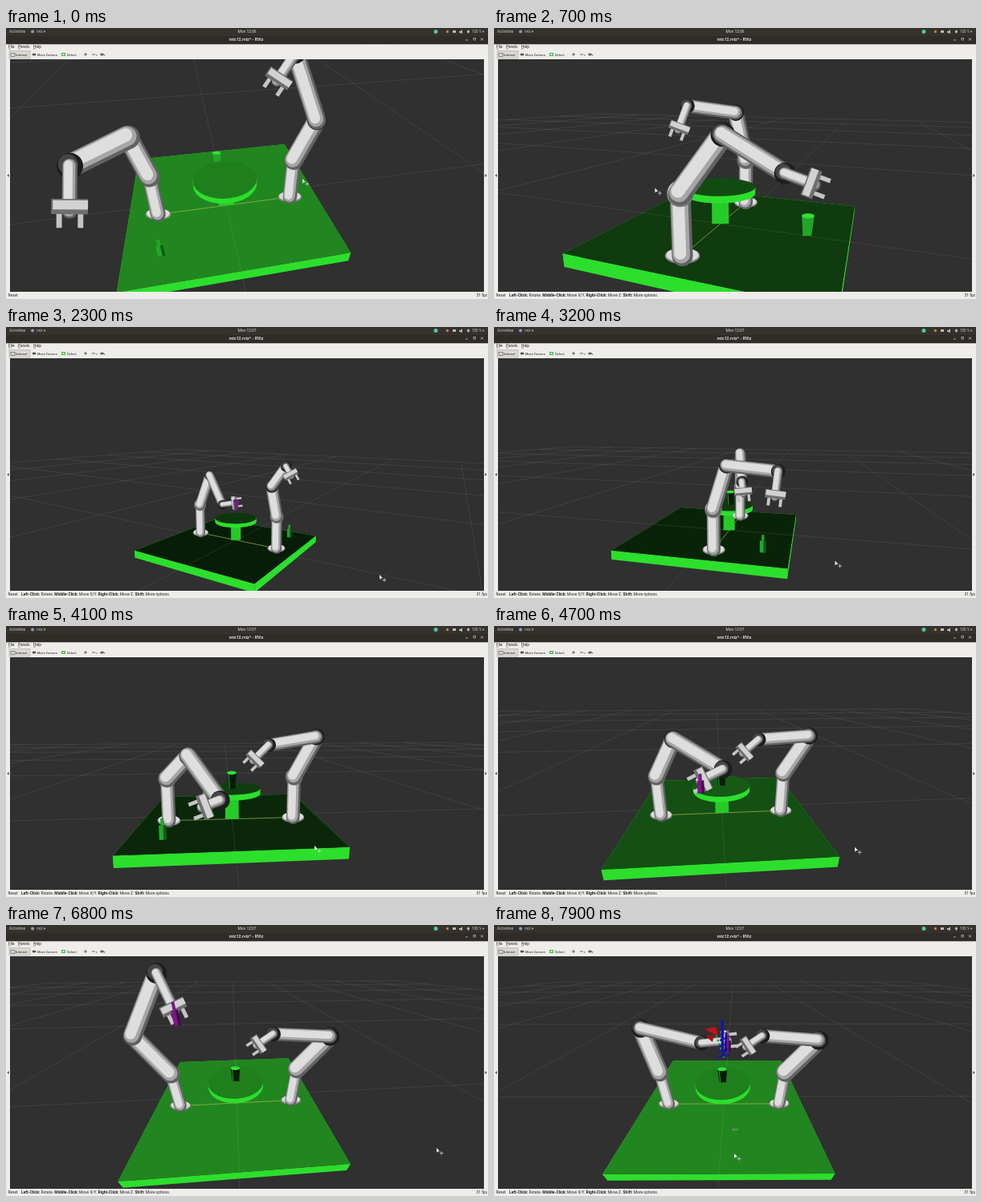
Animation of 600 by 338 pixels, one loop 8 s. Source, as an HTML page with a canvas:

```html
<!DOCTYPE html>
<html lang="en">
<head>
<meta charset="utf-8">
<title>RViz</title>
<style>
html, body { margin: 0; width: 100%; height: 100%; overflow: hidden; background: #303030 }
canvas { display: block; width: 600px; height: 338px }
</style>
</head>
<body>
<canvas id="stage" width="600" height="338"></canvas>
<script>
const g = document.getElementById('stage').getContext('2d');

// cam: yaw, pitch, distance, screen x and y of the slab centre, focal length
// arms: azimuth, then tilt from the vertical of upper arm, forearm and hand
const rest = [2.43, -.5, 1.75, 2.3];
const front = { cam: [6.21, .58, 1.144, 287, 213, 210], tone: [1], right: rest, cursor: [536, 278] };
const poses = [
  { t: 0, cam: [-.2, .62, 1.68, 272, 211, 378], tone: [1], cursor: [369, 188],
    left: [-2.05, .3, 1.4, 2.7], right: [2.4, -.35, .45, 2.6] },
  { t: 1100, cam: [3.16, 0, 1.53, 315, 267, 462], tone: [.12], cursor: [104, 206],
    left: [-1.37, .2, 1.5, 2.7], right: [2.21, 1.25, 3.1, 1.6] },
  { t: 2300, cam: [3.69, .14, 2.6, 280, 269, 420], tone: [.22], cursor: [465, 309],
    left: [-1.49, -.4, 1.2, 2.2], right: [4.39, .4, 2.7, 1.6] },
  { t: 4100, cam: [6.2, .16, 1.68, 281, 236, 350], tone: [.3], cursor: [384, 274],
    left: [-.88, 1, 2.2, 4.3], right: rest },
  { ...front, t: 5500, left: [-.07, 0, 1.65, 4] },
  { ...front, t: 6800, left: [.2, -.45, .6, 2.9] },
  { ...front, t: 7900, cam: [6.28, .58, 1.144, 287, 214, 210], cursor: [299, 285],
    left: [.3, -.1, 1.95, 1.6] }];

// World units: the slab is 1 wide and 1 deep, its top at z = 0
const row = -.07, baseX = .355, tableTop = .18, discRadius = .16;
const links = [.26, .3, .15];
const pink = '#7d1688', green = '#22a52b';
let cam;

function poseAt(t) {
  const i = Math.min(5, poses.findLastIndex(p => p.t <= t));
  const a = poses[i], b = poses[i + 1], u = (t - a.t) / (b.t - a.t);
  const mix = key => a[key].map((v, k) => v + (b[key][k] - v) * u);
  return { cam: mix('cam'), tone: mix('tone')[0], left: mix('left'), right: mix('right'), cursor: mix('cursor') };
}

// Returns screen x and y, depth, and pixels per world unit
function project([x, y, z = 0]) {
  const [yaw, pitch, dist, ox, oy, focal] = cam;
  const c = Math.cos(yaw), s = Math.sin(yaw), cp = Math.cos(pitch), sp = Math.sin(pitch);
  const away = y * c - x * s, depth = dist + away * cp - z * sp, scale = focal / depth;
  return [
    300 + (ox - 300) * dist / depth + scale * (x * c + y * s),
    184 + (oy - 184) * dist / depth - scale * (away * sp + z * cp), depth, scale];
}

function path(points, close) {
  g.beginPath();
  points.forEach(p => g.lineTo(p[0], p[1]));
  if (close) g.closePath();
}
function fill(points, color) { path(points, true); g.fillStyle = color; g.fill(); }
function line(points, color, width = 1) {
  path(points);
  g.strokeStyle = color; g.lineWidth = width; g.stroke();
}
function box(x, y, w, h, color) { g.fillStyle = color; g.fillRect(x, y, w, h); }
function frame(x, y, w, h, color) { g.strokeStyle = color; g.lineWidth = .6; g.strokeRect(x, y, w, h); }
function oval(x, y, rx, ry, color) {
  g.beginPath(); g.ellipse(x, y, rx, ry, 0, 0, 7);
  g.fillStyle = color; g.fill();
}
function text(str, x, y, size, color = '#222', weight = '', align = 'left') {
  g.font = `${weight} ${size}px Roboto, sans-serif`;
  g.textAlign = align; g.fillStyle = color;
  g.fillText(str, x, y);
  return x + g.measureText(str).width;
}
const lit = k => `rgb(${33 * k}, ${134 * k}, ${31 * k})`;
const side = '#2cdf2c';

function drawGrid() {
  const cell = 1.6;
  for (let i = -5; i <= 5; i++) for (const turn of [0, 1]) {
    let last;
    for (let j = -40; j <= 40; j++) {
      const p = [i * cell, j / 8 * cell], q = project(turn ? p.reverse() : p);
      if (q[2] < .15) { last = null; continue; }
      if (last) line([last, q], 'rgba(150,150,150,.26)', .6);
      last = q;
    }
  }
}

function drawSlab(tone) {
  const corners = z => [[-.5, -.5, z], [.5, -.5, z], [.5, .5, z], [-.5, .5, z]].map(project);
  const top = corners(0), low = corners(-.055);
  top.forEach((p, i) => {
    const j = (i + 1) % 4;
    fill([p, top[j], low[j], low[i]], side);
  });
  fill(top, lit(tone));
  line([[0, -.5], [0, .5]].map(project), 'rgba(190,210,180,.2)', .6);
  line([[-baseX, row], [baseX, row]].map(project), 'rgba(185,190,95,.8)', .8);
}

function drawTable(tone) {
  const foot = project([0, row]), head = project([0, row, tableTop]);
  line([foot, head], '#26cb28', .076 * head[3]);
  const ring = z => Array.from({ length: 32 }, (_, i) => {
    const a = i * Math.PI / 16;
    return project([discRadius * Math.cos(a), row + discRadius * Math.sin(a), z]);
  });
  for (let k = 6; k >= 1; k--) fill(ring(tableTop - k * .005), side);
  fill(ring(tableTop), lit(.25 + .7 * tone));
}

function armPoints(x, [azimuth, ...tilts]) {
  const points = [[x, row, 0], [x, row, .24]];
  tilts.forEach((tilt, i) => {
    const [px, py, pz] = points[i + 1], reach = links[i] * Math.sin(tilt);
    points.push([px + reach * Math.cos(azimuth), py + reach * Math.sin(azimuth), pz + links[i] * Math.cos(tilt)]);
  });
  return points;
}

function tube(p, q, width) {
  const layer = (d, color, k) =>
    line([p, q].map(v => [v[0] - d * width, v[1] - d * width]), color, width * k);
  layer(0, '#626262', 1);
  layer(.05, '#a6a6a6', .82);
  layer(.1, '#dedede', .56);
}

function ball([x, y], r, dark) {
  oval(x, y, r, r, dark ? '#1d1d1d' : '#777');
  oval(x - r * .15, y - r * .15, r * .75, r * .75, dark ? '#454545' : '#d8d8d8');
}

function drawArm(world) {
  const pts = world.map(project), [base, shoulder, elbow, wrist, tip] = pts;
  g.lineCap = 'round';
  const s = base[3];
  oval(base[0], base[1], .065 * s, .03 * s, '#8a8a8a');
  oval(base[0], base[1] - 1, .06 * s, .026 * s, '#dcdcdc');
  tube(base, shoulder, .078 * s);
  ball(shoulder, .05 * s);
  tube(shoulder, elbow, .084 * elbow[3]);
  ball(elbow, .044 * elbow[3], true);
  tube(elbow, wrist, .076 * wrist[3]);
  ball(wrist, .042 * wrist[3], true);
  tube(wrist, tip, .05 * tip[3]);
  g.lineCap = 'butt';
  // gripper
  const t = tip[3];
  g.save();
  g.translate(tip[0], tip[1]);
  g.rotate(Math.atan2(tip[1] - wrist[1], tip[0] - wrist[0]));
  box(-.04 * t, -.06 * t, .05 * t, .12 * t, '#6f6f6f');
  box(-.035 * t, -.06 * t, .03 * t, .115 * t, '#d2d2d2');
  for (const y of [-.045, .025]) box(.01 * t, y * t, .045 * t, .018 * t, '#c4c4c4');
  g.restore();
}

function drawBottle([x, y, z], color) {
  const low = project([x, y, z]), mid = project([x, y, z + .07]), top = project([x, y, z + .105]);
  const w = .034 * low[3];
  line([low, mid], color, w);
  line([low, mid].map(p => [p[0] + w * .3, p[1]]), 'rgba(0,0,0,.45)', w * .4);
  line([mid, top], color, w * .45);
}

function drawGlass([x, y, z], color) {
  const low = project([x, y, z]), top = project([x, y, z + .09]), r = .026 * top[3];
  fill([[top[0] - r, top[1]], [top[0] + r, top[1]], [low[0] + r * .7, low[1]], [low[0] - r * .7, low[1]]], color);
  line([[top[0] - r * .7, top[1]], [low[0] - r * .5, low[1]]], green, 1);
  oval(top[0], top[1], r, r * .4, color == pink ? pink : '#35df38');
}

function drawMarkers() {
  fill([[262, 130], [276, 127], [279, 138]], '#c31318');
  fill([[264, 139], [274, 136], [272, 146]], '#a01015');
  for (let i = 0; i < 6; i++) {
    const y = 124 + i * 7;
    line([[283 - i, y + 6], [285 + i * 1.6, y + 3]], '#1717b5', 2.2);
    oval(277 + i * 1.8, 139 + i * 5, 1.3, 1.5, green);
  }
  line([[284, 119], [285, 164]], '#1515a8', 3.5);
  line([[289, 134], [288, 158]], '#111188', 2.5);
  oval(300, 255, 4, 1.5, '#5e8e58');
}

function drawCursor([x, y]) {
  fill([[x, y], [x, y + 6], [x + 1.6, y + 4.6], [x + 4, y + 4.3]], '#eee');
  line([[x + 3.5, y + 6.5], [x + 8.5, y + 6.5]], '#ccc', .8);
  line([[x + 6, y + 4], [x + 6, y + 9]], '#ccc', .8);
}

function drawWindow(t) {
  const panel = '#efedea';
  box(0, 0, 600, 10, '#35322d');
  box(0, 10, 600, 10.5, '#2f2c28');
  box(0, 20.3, 600, 18.7, panel);
  box(0, 39, 5, 290, panel);
  box(595, 39, 5, 290, panel);
  box(0, 329, 600, 9, panel);
  fill([[3.5, 182], [3.5, 186], [1.5, 184]], '#333');
  fill([[596.5, 182], [596.5, 186], [598.5, 184]], '#333');

  text('Activities', 4, 6.3, 5, '#ccc');
  oval(33, 4.5, 2, 2, '#8aa0b8');
  text('rviz ▾', 38, 6.3, 4.8, '#ccc');
  text(t < 1700 ? 'Mon 12:06' : 'Mon 12:07', 300, 6.3, 4.9, '#ddd', '', 'center');
  oval(535, 4.5, 2.5, 2.5, '#58c79a');
  oval(549.5, 4.5, 1.6, 1.8, '#c4863b');
  box(556, 3, 4, 3, '#bbb');
  fill([[564, 4], [566, 4], [568, 2], [568, 7], [564, 5.5]], '#bbb');
  oval(575.5, 4.5, 1.5, 2, '#bbb');
  text('100 % ▾', 580, 6.3, 4.5, '#ccc');
  text('mtc12.rviz* - RViz', 299, 16.3, 5.2, '#ddd', 'bold', 'center');
  line([[572, 15], [575, 15]], '#ddd', .7);
  frame(582, 12.5, 2.5, 2.5, '#ddd');
  line([[591, 12.5], [594, 15.5]], '#ddd', .7);
  line([[594, 12.5], [591, 15.5]], '#ddd', .7);

  [['File', 3], ['Panels', 15], ['Help', 34]].forEach(([word, x]) => {
    text(word, x, 25, 4.8);
    line([[x, 26], [x + 2.7, 26]], '#222', .5);
  });
  box(4, 28.5, 26, 9.5, '#dad7d3');
  frame(4, 28.5, 26, 9.5, '#aaa');
  frame(6, 31.5, 5, 4, '#555');
  text('Interact', 12, 34.8, 4.2);
  oval(35, 33, 2.5, 1.5, '#555');
  text('Move Camera', 39, 34.8, 4);
  box(69, 31, 5, 4, '#3cb44b');
  box(70, 32, 3, 2, '#cde8c9');
  text('Select', 76, 34.8, 4.2);
  line([[97, 33], [101, 33]], '#555', .9);
  line([[99, 31], [99, 35]], '#555', .9);
  line([[107, 33], [111, 33]], '#555', .9);
  oval(119.5, 33, 2.5, 1.5, '#666');
  for (const x of [112, 122]) text('▾', x, 35, 3);

  text('Reset', 2.5, 335.3, 4.8);
  if (t >= 200) {
    let x = 19;
    ['Left-Click:', ' Rotate. ', 'Middle-Click:', ' Move X/Y. ', 'Right-Click:', ' Move Z. ', 'Shift:', ' More options.']
      .forEach((part, i) => x = text(part, x, 335.3, 4.95, '#222', i % 2 ? '' : 'bold'));
  }
  text('31 fps', 599, 335.3, 4.8, '#222', '', 'right');
}

function drawScene(t) {
  const pose = poseAt(t);
  cam = pose.cam;
  box(0, 0, 600, 338, '#303030');
  drawGrid();
  drawSlab(pose.tone);

  const left = armPoints(-baseX, pose.left), right = armPoints(baseX, pose.right);
  const grip = ([x, y, z]) => [x, y, z - .07];
  const bottleHeld = t >= 4700, glassHeld = t >= 1400 && t < 2800;
  const bottle = bottleHeld ? grip(left[4]) : [-.33, -.35, 0];
  const glass = glassHeld ? grip(right[4]) : t < 1400 ? [0, .33, 0] : [0, row - .01, tableTop];
  const depth = p => project([p[0], p[1]])[2];
  [
    [depth([0, row]), () => drawTable(pose.tone)],
    [depth(left[4]), () => drawArm(left)],
    [depth(right[4]), () => drawArm(right)],
    [depth(bottle) - .01, () => drawBottle(bottle, bottleHeld ? pink : green)],
    [depth(glass) - .01, () => drawGlass(glass, glassHeld ? pink : t < 1400 ? green : '#061c08')]
  ].sort((a, b) => b[0] - a[0]).forEach(item => item[1]());

  if (t >= 7500) drawMarkers();
  drawCursor(pose.cursor);
}

const start = performance.now();
function tick() {
  const t = Math.floor((performance.now() - start) % 8000 / 100) * 100;
  drawScene(t);
  drawWindow(t);
  requestAnimationFrame(tick);
}
tick();
</script>
</body>
</html>
```
